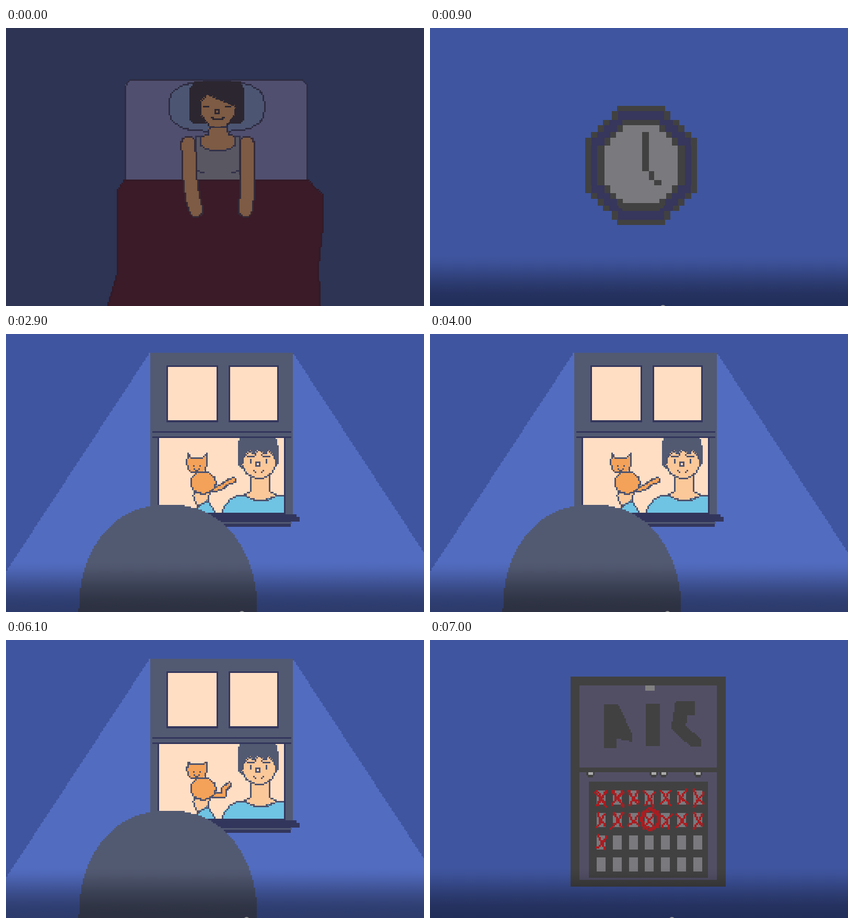
Recreate the animation shown at these times as an HTML page with a canvas. Size 800 by 532 pixels, loop 7.1 s.

```html
<!DOCTYPE html>
<html lang="en">
<head>
<meta charset="utf-8">
<title>Night window</title>
<style>
html, body { margin: 0; width: 100%; height: 100%; overflow: hidden; background: #3f559f; }
canvas { display: block; width: 800px; height: 532px; }
</style>
</head>
<body>
<canvas id="stage" width="800" height="532"></canvas>
<script>
const ctx = document.getElementById('stage').getContext('2d');
const LOOP = 7100, W = 800, H = 532, CELL = 3;
const NIGHT = '#3f559f', BEAM = '#526cc0', SLATE = '#525a72', INK = '#33365c', PEACH = '#ffdec4';
const SKIN = '#fbc899', ORANGE = '#f4a259', SHIRT = '#6fc3e3', LINE = '#4e536d';
const CHARCOAL = '#414141', NAVY = '#37365c', GREY = '#7a797d', PANEL = '#524f65', RED = '#a91d21';

const clamp = v => Math.max(0, Math.min(1, v));
const snap = v => Math.round(v / CELL) * CELL;

function rect(x, y, w, h, color) {
  ctx.fillStyle = color;
  ctx.fillRect(x, y, w, h);
}

// Scanline fill with edges snapped to a coarse grid. Points are x, y, x, y...
function poly(p, color) {
  const ys = p.filter((_, i) => i % 2);
  const end = Math.min(H, Math.max(...ys));
  for (let y = snap(Math.min(...ys)); y < end; y += CELL) {
    const mid = y + CELL / 2, hits = [];
    for (let i = 0; i < p.length; i += 2) {
      const j = (i + 2) % p.length;
      const [ax, ay, bx, by] = [p[i], p[i + 1], p[j], p[j + 1]];
      if (ay > mid !== by > mid) hits.push(ax + (mid - ay) / (by - ay) * (bx - ax));
    }
    hits.sort((a, b) => a - b);
    for (let i = 0; i + 1 < hits.length; i += 2) {
      rect(snap(hits[i]), y, snap(hits[i + 1]) - snap(hits[i]), CELL, color);
    }
  }
}

// Calls visit(x, y) at even steps along a polyline.
function walk(p, closed, visit) {
  const n = closed ? p.length : p.length - 2;
  for (let i = 0; i < n; i += 2) {
    const j = (i + 2) % p.length, dx = p[j] - p[i], dy = p[j + 1] - p[i + 1];
    const steps = Math.max(1, Math.ceil(Math.max(Math.abs(dx), Math.abs(dy)) / CELL));
    for (let k = 0; k <= steps; k++) visit(p[i] + dx * k / steps, p[i + 1] + dy * k / steps);
  }
}

function stroke(p, color, closed = false, size = CELL) {
  walk(p, closed, (x, y) => rect(snap(x) - 1, snap(y) - 1, size, size, color));
}

function shape(p, fill, outline) {
  poly(p, fill);
  stroke(p, outline, true);
}

// Superellipse; a higher power gives squarer corners.
function blob(cx, cy, rx, ry, power = 2) {
  const bend = v => Math.sign(v) * Math.abs(v) ** (2 / power);
  return Array.from({ length: 40 }, (_, i) => i * Math.PI / 20)
    .flatMap(a => [cx + rx * bend(Math.cos(a)), cy + ry * bend(Math.sin(a))]);
}

// Symmetric outline from the right half, given as offsets from cx and heights.
function mirror(cx, half) {
  const right = [], left = [];
  for (let i = 0; i < half.length; i += 2) {
    right.push(cx + half[i], half[i + 1]);
    left.unshift(cx - half[i], half[i + 1]);
  }
  return [...right, ...left];
}

function limb(path, r, fill, outline) {
  walk(path, false, (x, y) => poly(blob(x, y, r + 2, r + 2), outline));
  walk(path, false, (x, y) => poly(blob(x, y, r - 1, r - 1), fill));
}

function drawNose(x, y, color, inside) {
  rect(x - 5, y - 5, 10, 10, color);
  rect(x - 2, y - 2, 4, 4, inside);
}

function drawBed(t) {
  const skin = '#7d5b44', edge = '#2e2c42', dark = '#2c2630', seam = '#33324a';
  rect(0, 0, W, H, '#2d3454');
  shape(mirror(402, [165, 100, 175, 111, 175, 300]), '#504f6f', edge);
  shape(blob(403, 150, 91, 47, 3), '#4c5673', edge);

  poly(mirror(404, [44, 101, 53, 118, 53, 176, 46, 182, 27, 182]), dark);
  shape([384, 126, 373, 140, 373, 166, 388, 187, 405, 191, 422, 187, 438, 165, 440, 150], skin, dark);
  shape(mirror(406, [17, 188, 19, 203, 36, 208, 36, 238]), skin, edge);
  poly(blob(405, 176, 16, 13), skin);
  stroke([378, 150, 388, 150], dark);
  stroke([420, 150, 429, 150], dark);
  drawNose(404, 160, dark, skin);
  stroke([393, 170, 396, 174, 413, 174, 416, 170], dark);

  shape(mirror(405, [0, 235, 25, 231, 33, 224, 33, 208, 41, 208, 44, 293]), '#595762', seam);

  const breath = 3 * Math.sin(Math.PI * t / 900);
  const blanket = [226, 292, 578, 292, 606, 318, 607, 370, 597, 460, 602, 540,
    192, 540, 214, 465, 214, 310];
  shape(blanket.map((v, i) => i % 2 ? v : v + Math.sign(v - 404) * breath), '#3a1b27', '#331a27');

  for (const side of [-1, 1]) {
    stroke([405 + side * 40, 273, 405 + side * 27, 276], seam);
    limb([405 + side * 56, 221, 406 + side * 55, 280, 409 + side * 52, 325, 411 + side * 47, 348],
      13, skin, '#352b38');
  }
}

// Stepped octagon: each stair narrows by how far it reaches from the middle.
function octagon(halfW, halfH, reach, color) {
  for (const d of [114, 104, 87, 77, 64, 53, 38]) {
    if (d > halfH) continue;
    const half = Math.min(halfW, reach - d);
    rect(404 - half, 263 - d, half * 2, d * 2, color);
  }
}

function drawClock() {
  rect(0, 0, W, H, NIGHT);
  octagon(107, 114, 160, CHARCOAL);
  octagon(96, 104, 148, NAVY);
  octagon(84, 87, 123, CHARCOAL);
  octagon(70, 77, 112, GREY);
  rect(361, 335, 86, 10, CHARCOAL);
  rect(406, 199, 13, 75, CHARCOAL);
  rect(419, 274, 10, 17, CHARCOAL);
  rect(429, 291, 14, 10, CHARCOAL);
}

function drawCat(stretched) {
  const tip = stretched ? [412, 293, 424, 284, 435, 280] : [416, 297, 418, 284, 427, 277];
  limb([398, 298, ...tip], 4, ORANGE, LINE);
  shape(blob(377, 284, 24, 21), ORANGE, LINE);
  const ear = stretched ? 229 : 233;
  shape(mirror(365, [10, 238, 18, ear, 19, 250, 15, 262, 5, 265]), ORANGE, LINE);
  for (const x of [358, 370]) rect(x, 251, 3, 3, LINE);
  stroke([360, 258, 364, 261, 369, 258], LINE);
}

function drawMan() {
  shape(mirror(486, [18, 265, 18, 300, 32, 309, 0, 320]), SKIN, LINE);
  shape(mirror(487, [0, 318, 14, 317, 32, 309, 46, 309, 60, 318, 70, 330, 74, 345]), SHIRT, LINE);
  poly(mirror(482, [35, 199, 39, 214, 39, 250, 30, 258]), SLATE);
  shape(mirror(484, [0, 221, 10, 229, 18, 223, 28, 232, 33, 250, 24, 266, 8, 276]), SKIN, LINE);
  for (const side of [-1, 1]) {
    const x = 483 + side * 15;
    stroke([x - side * 9, 232, x + side * 5, 235], LINE);
    stroke([x, 239, x, 247], LINE);
    stroke([483 + side * 9, 261, 483 + side * 6, 264], LINE);
  }
  drawNose(482, 249, LINE, PEACH);
}

function drawWindow(t) {
  rect(0, 0, W, H, NIGHT);
  poly(mirror(412, [137, 36, 412, 455, 412, 534]), BEAM);
  rect(276, 36, 273, 309, SLATE);
  for (const [x, w] of [[307, 99], [426, 96]]) {
    rect(x, 60, w, 109, INK);
    rect(x + 3, 63, w - 6, 102, PEACH);
  }
  rect(280, 186, 266, 3, INK);
  rect(280, 196, 266, 3, INK);
  rect(290, 199, 245, 146, INK);
  rect(293, 199, 239, 143, PEACH);

  ctx.save();
  ctx.beginPath();
  ctx.rect(293, 199, 239, 143);
  ctx.clip();
  shape([360, 302, 358, 310, 367, 333, 384, 322, 390, 303], SKIN, LINE);
  shape([369, 328, 386, 318, 402, 345, 364, 345], SHIRT, LINE);
  drawCat(Math.floor((t - 2900) / 450) % 2 === 0);
  drawMan();
  ctx.restore();

  rect(280, 345, 276, 14, INK);
  rect(280, 359, 265, 10, INK);
  rect(556, 350, 6, 9, INK);
  rect(400, 360, 147, 3, SLATE);
  poly(blob(310, 534, 171, 208, 2.2), SLATE);
}

function drawCalendar() {
  rect(0, 0, W, H, NIGHT);
  rect(269, 70, 297, 402, CHARCOAL);
  rect(286, 87, 263, 157, PANEL);
  rect(412, 87, 18, 10, '#818181');
  rect(286, 253, 263, 206, PANEL);
  rect(304, 271, 228, 184, CHARCOAL);

  poly([334, 122, 359, 122, 388, 181, 388, 195, 358, 189, 358, 206, 334, 206], CHARCOAL);
  rect(413, 122, 27, 81, CHARCOAL);
  poly([470, 118, 508, 118, 508, 144, 492, 144, 490, 164, 518, 190, 518, 203, 498, 203, 461, 170], CHARCOAL);

  for (const x of [307, 428, 447, 513]) {
    rect(x - 8, 253, 16, 6, CHARCOAL);
    rect(x - 5, 259, 10, 4, CHARCOAL);
    rect(x - 4, 253, 9, 5, '#aaa');
  }

  let seed = 7;
  const jitter = size => {
    seed = seed * 16807 % 2147483647;
    return (seed / 2147483647 - .5) * 2 * size;
  };
  for (let day = 0; day < 28; day++) {
    const x = 319 + day % 7 * 30.8, y = 288 + Math.floor(day / 7) * 42.8;
    rect(Math.round(x), Math.round(y), 17, 27, GREY);
    if (day > 14) continue;
    const marks = Math.max(2, 5 - day);
    for (let i = 0; i < marks; i++) {
      const lean = i % 2 ? -9 : 9;
      stroke([x + 8 - lean + jitter(3), y + jitter(3), x + 8 + jitter(2), y + 14,
        x + 8 + lean + jitter(3), y + 26 + jitter(4)], RED, false, 4);
    }
  }
  for (const r of [15, 18]) stroke(blob(421, 342, r, r + 2), RED, true, 4);
}

// Player shade along the bottom, with its progress knob just peeking in.
function drawShade(t) {
  ctx.globalAlpha = t < 5450 ? clamp((5360 - t) / 600) : clamp((t - 5450) / 300);
  const top = 436, g = ctx.createLinearGradient(0, top, 0, H);
  for (let k = 0; k <= 1; k += .125) {
    g.addColorStop(k, `rgba(0,0,8,${.46 * Math.sin(k * Math.PI / 2) ** 1.4})`);
  }
  rect(0, top, W, H - top, g);
  ctx.fillStyle = '#959595';
  ctx.beginPath();
  ctx.arc(443.4 + t * .0028, 536, 6, 0, 2 * Math.PI);
  ctx.fill();
  ctx.globalAlpha = 1;
}

function frame(now) {
  const t = Math.floor(now % LOOP / 100) * 100;
  if (t < 900) drawBed(t);
  else {
    if (t < 2900) drawClock();
    else if (t < 6300) drawWindow(t);
    else drawCalendar();
    drawShade(t);
  }
  requestAnimationFrame(frame);
}
requestAnimationFrame(frame);
</script>
</body>
</html>
```
